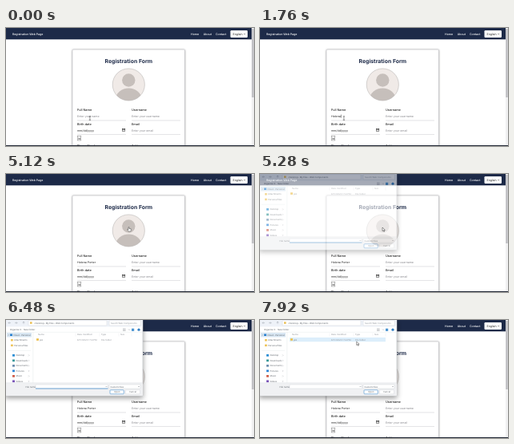
Write an HTML page that moves like this. It is 310 px wide and 148 px high and loops after 8 s.

```html
<!DOCTYPE html>
<html lang="en">
<head>
<meta charset="utf-8">
<title>Registration form</title>
<style>
  html, body { margin: 0; width: 100%; height: 100%; overflow: hidden; background: #fff; }
  svg { display: block; width: 100vw; height: 100vh; }
  text { font-family: Inter, "Open Sans", sans-serif; font-size: 3.55px; fill: #222; white-space: pre; text-rendering: geometricPrecision; }
  .nav { fill: #fff; font-weight: 500; }
  .label { font-size: 3.85px; font-weight: 500; }
  .hint { fill: #85858a; }
  .title { font-size: 6.9px; font-weight: 700; fill: #1d2a48; text-anchor: middle; }
  #dialog text { font-family: "Open Sans", sans-serif; font-size: 2.8px; fill: #555b62; }
  #dialog .soft { fill: #8b9097; }
</style>
</head>
<body>
<svg id="stage" viewBox="0 0 310 148" preserveAspectRatio="none">
  <defs>
    <filter id="cardShadow" x="-10%" y="-10%" width="120%" height="120%"><feDropShadow dx="0" dy=".5" stdDeviation="1.2" flood-opacity=".4"/></filter>
    <filter id="dialogShadow" x="-10%" y="-10%" width="120%" height="130%"><feDropShadow dx="0" dy="2.5" stdDeviation="3" flood-opacity=".42"/></filter>
    <clipPath id="round"><circle cx="153.3" cy="71" r="20"/></clipPath>
  </defs>
  <rect width="310" height="148" fill="#fff"/>
  <rect x="83" y="27" width="140.5" height="130" rx="1" fill="#fff" stroke="#a9a9ad" stroke-width=".5" filter="url(#cardShadow)"/>
  <rect width="307" height="14.3" fill="#1d2a48"/>
  <rect x="280.5" y="3" width="21.5" height="9" rx="1.2" fill="#fff"/>
  <path d="M297.2 7l1 1.1 1-1.1" fill="none" stroke="#333" stroke-width=".5"/>
  <g clip-path="url(#round)">
    <rect x="133" y="50" width="41" height="42" fill="#f0eae7"/>
    <circle cx="153.3" cy="65.5" r="8.2" fill="#c6bfbb"/>
    <ellipse cx="153.3" cy="89" rx="16" ry="13.5" fill="#c6bfbb"/>
  </g>
  <circle cx="153.3" cy="71" r="20.1" fill="none" stroke="#b9b5b4" stroke-width=".6"/>
  <g id="page"></g>
  <text id="value" x="89" y="112"></text>
  <rect id="caret" y="108.6" width=".5" height="4" fill="#222"/>
  <g fill="none" stroke="#222" stroke-width=".5">
    <rect x="145.6" y="126.5" width="3.2" height="3.2"/><path d="M145.6 127.2h3.2" stroke-width=".8"/>
    <rect x="89.2" y="135.4" width="4.6" height="5.6" stroke="#777"/>
  </g>
  <rect x="307" width="3" height="148" fill="#f0f0f1"/>
  <rect x="307.3" y="1" width="2.4" height="86" fill="#bdbdc1"/>
  <rect y="147" width="310" height="1" fill="#252b38"/>
  <g id="dialog"></g>
  <path id="beam" d="M103.7 110.8h2.4M104.9 110.8v4.6M103.7 115.4h2.4" fill="none" stroke="#333" stroke-width=".5"/>
  <path id="arrow" d="M0-2v4.6l1.1-1 .8 1.8.8-.4-.8-1.7h1.5z" fill="#fff" stroke="#222" stroke-width=".45"/>
  <path id="hand" d="M0-2.3v3l-1-.5-.3.6 1.5 2.2h2.5l.6-1.4V-.1L1-.5v-1.8z" fill="#fff" stroke="#333" stroke-width=".45"/>
</svg>
<script>
const $ = id => document.getElementById(id);
const text = (x, y, words, kind = '') => `<text x="${x}" y="${y}" class="${kind}">${words}</text>`;
const box = (x, y, w, h, fill, extra = '') =>
  `<rect x="${x}" y="${y}" width="${w}" height="${h}" fill="${fill}" ${extra}/>`;
const line = (d, color, width = .4) => `<path d="${d}" fill="none" stroke="${color}" stroke-width="${width}"/>`;
const edge = 'stroke="#c9ccd1" stroke-width=".35" rx=".6"';

$('page').innerHTML =
  text(8, 8.8, 'Registration Web Page', 'nav') +
  text(231, 8.8, 'Home', 'nav') + text(246.7, 8.8, 'About', 'nav') + text(262, 8.8, 'Contact', 'nav') +
  text(283.5, 8.8, 'English') + text(153.3, 44.3, 'Registration Form', 'title') +
  text(89, 103.7, 'Full Name', 'label') + text(157, 103.7, 'Username', 'label') +
  text(89, 122, 'Birth date', 'label') + text(157, 122, 'Email', 'label') +
  text(89, 148.8, 'Phone Number', 'label') + text(157, 148.8, 'Address', 'label') +
  text(157, 112, 'Enter your username', 'hint') + text(157, 129.8, 'Enter your email', 'hint') +
  text(89, 129.8, 'mm/dd/yyyy') + text(90, 139.6, 'Id') +
  [116, 133.6].map(y => line(`M89 ${y}h61M157 ${y}h61`, '#b5b5ba')).join('');

function buildDialog() {
  const places = ['Desktop', 'Downloads', 'Documents', 'Pictures', 'Music', 'Videos'];
  const colors = ['#2d8fd5', '#3b9a9a', '#6d8fb0', '#2f86d8', '#d0604c', '#7a55b8'];
  let out = box(-1, -1, 172, 96, '#fff', 'stroke="#a3a7ad" stroke-width=".5" filter="url(#dialogShadow)"') +
    box(0, 0, 170.8, 8.4, '#eef2f8') +
    box(28, .6, 98, 6.3, '#fff', edge) + box(129, .6, 39.5, 6.3, '#fff', edge) +
    line('M6 3.6H3l1.2-1.2M3 3.6l1.2 1.2M11 3.6h3l-1.2-1.2M14 3.6l-1.2 1.2M22 5V2l-1.3 1.3M22 2l1.3 1.3', '#8a9098') +
    box(30, 2.4, 2.6, 2.4, '#e9bd50') +
    text(35, 4.7, '› Desktop › My files › Web Components') + text(131, 4.7, 'Search Web Components', 'soft') +
    text(5, 13, 'Organize ▾') + text(22, 13, 'New folder') +
    line('M146 11h3.6M146 12.2h3.6M146 13.4h3.6M153 11.5l1 1 1-1', '#777d84') +
    box(157, 10.7, 3.2, 3.2, '#4b94d1') + '<circle cx="166" cy="12.2" r="1.6" fill="#327fc4"/>' +
    line('M0 15.3h170.8M33.8 15.3v63.5', '#dfe2e6') +
    box(1, 16, 31, 5.5, '#d9e7f3') + line('M2.5 17.8l1 1-1 1', '#777') +
    box(5, 17.5, 3, 2.5, '#2d82cf') + text(9.2, 19.8, 'Cloud - Personal');
  ['Attachments', 'Personal files'].forEach((name, i) => {
    out += box(6, 24 + i * 6.6, 2.8, 2.5, '#edc45a') + text(10, 26.4 + i * 6.6, name);
  });
  out += line('M2 38.3h29', '#dfe2e6');
  places.forEach((name, i) => {
    const y = 43 + i * 6.5;
    out += box(8, y, 3, 2.7, colors[i]) + text(12.5, y + 2.4, name) + line(`M28 ${y + .4}l1 1-1 1`, '#90959b', .35);
  });
  out += '<rect id="row" x="37" y="21.9" width="120" height="5.3" fill="#dceefb"/>' +
    [[40, 'Name'], [89, 'Date modified'], [119, 'Type'], [143, 'Size']].map(([x, name]) => text(x, 19.4, name, 'soft')).join('') +
    line('M87 16.5v4M117 16.5v4M141 16.5v4M157 16.5v4', '#e3e5e8') +
    box(38, 23.2, 3, 2.6, '#ecbf4d') + text(42.3, 25.6, 'pic') +
    text(89, 25.6, '8/31/2023 1:54 PM', 'soft') + text(119, 25.6, 'File folder', 'soft') +
    box(0, 78.8, 170.8, 16, '#f0f1f3') + line('M0 78.8h170.8', '#dadde1') +
    text(24.5, 84.5, 'File name:') + box(37, 81, 90.5, 5, '#fff', edge) + box(129, 81, 39, 5, '#fff', edge) +
    '<path id="focus" d="M37 86h90.5" stroke="#3485c9" stroke-width=".7"/>' +
    '<path id="fileCaret" d="M38 82v3" stroke="#333" stroke-width=".35"/>' +
    line('M124.5 83l1 1 1-1M165 83l1 1 1-1', '#686e75') + text(130.5, 84.5, 'Custom Files') +
    box(130, 87.8, 17.3, 5, '#fff', 'stroke="#3485c9" stroke-width=".55" rx=".8"') + text(135.3, 91.3, 'Open') +
    box(149.5, 87.8, 18, 5, '#fff', edge) + text(154.3, 91.3, 'Cancel');
  $('dialog').innerHTML = out;
}
buildDialog();

const NAME = 'Helena Porter';
const KEY_TIMES = [400, 800, 1440, 1520, 1680, 1760, 2080, 2480, 2560, 2960, 2960, 3120, 3280];
const show = (id, visible) => $(id).setAttribute('visibility', visible ? 'visible' : 'hidden');
const move = (id, x, y) => $(id).setAttribute('transform', `translate(${x} ${y})`);
const progress = (t, from, to) => Math.min(1, Math.max(0, (t - from) / (to - from)));

function render(t) {
  const typed = KEY_TIMES.filter(time => t >= time).length;
  const value = $('value');
  value.textContent = typed ? NAME.slice(0, typed) : 'Enter your name';
  value.setAttribute('class', typed ? '' : 'hint');
  $('caret').setAttribute('x', 89.2 + (typed ? value.getComputedTextLength() : 0));
  show('caret', t >= 240 && t < 3280);

  const p = progress(t, 3840, 4320);
  const ease = p * p * (3 - 2 * p);
  const hovering = t >= 7840;
  show('beam', t < 3840);
  show('hand', t >= 4320 && t < 5280);
  show('arrow', t >= 3840 && t < 4320 || t >= 5280 && t < 6000 || hovering);
  move('hand', 153, 69 + (t >= 4880 && t < 5120 ? .4 : 0));
  if (hovering) move('arrow', 120.7, 29 - 2 * (1 - progress(t, 7840, 7920)));
  else move('arrow', 105 + 48 * ease, 113 - 44 * ease);

  const open = t >= 5280;
  show('dialog', open);
  $('dialog').setAttribute('opacity', .6 + .4 * progress(t, 5280, 5440));
  show('row', open && hovering);
  show('focus', open && t < 7120);
  show('fileCaret', open && t >= 6000 && t < 6480);
}

function frame(now) {
  render(now % 8000);
  requestAnimationFrame(frame);
}
requestAnimationFrame(frame);
</script>
</body>
</html>
```
